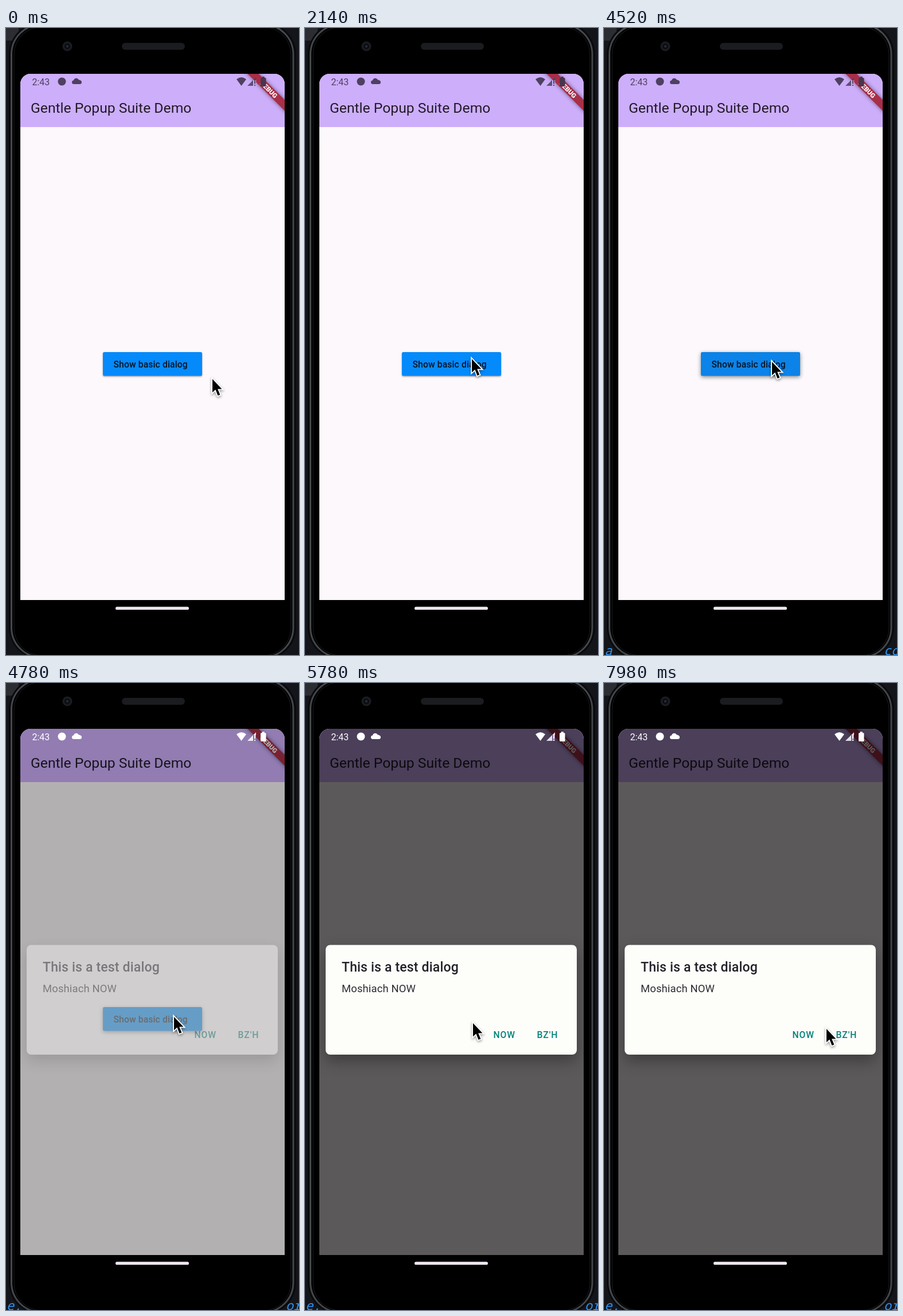
An HTML page with a canvas for the animation above (8 s loop, 511 by 1095 pixels).

```html
<!DOCTYPE html>
<html lang="en">
<head>
<meta charset="utf-8">
<title>Dialog demo</title>
<style>
html, body { margin: 0; width: 100%; height: 100%; overflow: hidden; background: #101116; }
canvas { display: block; width: 511px; height: 1095px; }
</style>
</head>
<body>
<canvas id="stage" width="511" height="1095"></canvas>
<script>
const W = 511, H = 1095, LOOP = 8000;
const PRESS = 3980, OPEN = 4620;
const main = document.getElementById('stage').getContext('2d');
const sheet = document.createElement('canvas');
sheet.width = W;
sheet.height = H;

const clamp = v => Math.max(0, Math.min(1, v));
const span = (t, a, b) => clamp((t - a) / (b - a));
const smooth = p => p * p * (3 - 2 * p);
const mix = (a, b, p) => a + (b - a) * p;
const easeOut = (p, power) => 1 - Math.pow(1 - p, power);

// time, x, y of the pointer tip
const POINTER = [
  [20, 360, 613], [1960, 291, 578], [2960, 291, 578], [3680, 293, 583],
  [5400, 293, 583], [5780, 293, 594], [6300, 293, 594], [7880, 388, 604]
];

function pointerAt(t) {
  let from = POINTER[0];
  for (const to of POINTER) {
    if (t < to[0]) {
      const p = smooth(span(t, from[0], to[0]));
      return [mix(from[1], to[1], p), mix(from[2], to[2], p)];
    }
    from = to;
  }
  return [from[1], from[2]];
}

function box(c, x, y, w, h, r, fill) {
  c.beginPath();
  c.roundRect(x, y, w, h, r);
  if (fill) {
    c.fillStyle = fill;
    c.fill();
  }
}

function dot(c, x, y, r, fill) {
  c.beginPath();
  c.arc(x, y, r, 0, Math.PI * 2);
  c.fillStyle = fill;
  c.fill();
}

function poly(c, points) {
  c.beginPath();
  points.forEach(([x, y]) => c.lineTo(x, y));
  c.closePath();
}

function label(c, text, x, y, size, color, weight = 400, spacing = 0) {
  c.font = `${weight} ${size}px Roboto, sans-serif`;
  c.letterSpacing = spacing + 'px';
  c.fillStyle = color;
  c.fillText(text, x, y);
}

function shadow(c, color, blur, dy) {
  c.shadowColor = color;
  c.shadowBlur = blur;
  c.shadowOffsetY = dy;
}

function drawBackdrop(c, t) {
  c.fillStyle = '#14151a';
  c.fillRect(0, 0, W, H);
  c.fillStyle = '#2c2d32';
  c.fillRect(0, 0, 22, 22);
  if (t < PRESS) return;
  c.font = 'italic 22px "Noto Sans Mono", monospace';
  c.letterSpacing = '0px';
  c.fillStyle = '#2b95f5';
  const [left, right] = t < OPEN ? ['a', 'co'] : ['e.', 'or'];
  c.fillText(left, 1, 1095);
  c.fillText(right, 488, 1095);
}

function drawPhone(c) {
  box(c, 5, -10, 501, 1113, 56, '#090a0b');
  box(c, 9.5, -6, 491.5, 1105, 52, '#000');
  c.lineWidth = 3;
  c.strokeStyle = '#43474c';
  c.stroke();
  box(c, 14, -2, 483, 1098, 48, '#000');
  c.lineWidth = 1;
  c.strokeStyle = '#1d1e20';
  c.stroke();
  dot(c, 107, 32, 8.5, '#1b1c20');
  dot(c, 107, 32, 5, '#0c0d12');
  dot(c, 107, 32, 2.2, '#262a38');
  box(c, 202, 26, 110, 12, 6, '#1b1c20');
}

function drawBanner(c) {
  c.save();
  c.translate(458.5, 107.5);
  c.rotate(Math.PI / 4);
  shadow(c, 'rgba(0,0,0,.5)', 7, 0);
  c.fillStyle = '#a92e48';
  c.fillRect(-60, -6.7, 120, 13.4);
  shadow(c, 'transparent', 0, 0);
  c.textAlign = 'center';
  label(c, 'DEBUG', 0, 4, 11.4, '#fff', 900);
  c.restore();
}

function drawButton(c, t) {
  const lift = smooth(span(t, PRESS, PRESS + 200));
  c.save();
  shadow(c, `rgba(0,0,0,${mix(.38, .45, lift)})`, mix(3, 7, lift), mix(1.3, 2.2, lift));
  box(c, 169, 566, 173, 41.5, 2.5, '#058afb');
  c.restore();
  if (t > PRESS) {
    c.save();
    box(c, 169, 566, 173, 41.5, 2.5);
    c.clip();
    const fade = 1 - span(t, 4300, 4700);
    c.fillStyle = `rgba(0,110,150,${.2 * lift})`;
    c.fillRect(169, 566, 173, 42);
    dot(c, 287, 579, mix(5, 190, span(t, PRESS, PRESS + 900)), `rgba(50,125,235,${.4 * fade})`);
    c.restore();
  }
  label(c, 'Show basic dialog', 187.5, 592.5, 15.7, '#0a1422', 500, .11);
}

function drawStatus(c, t) {
  const p = span(t, OPEN, OPEN + 100);
  const ink = `rgb(${mix(78, 255, p)},${mix(64, 255, p)},${mix(96, 255, p)})`;
  label(c, '2:43', 45.5, 99.5, 16, ink);
  dot(c, 97.5, 93.5, 7, ink);

  // cloud
  box(c, 115, 91.5, 17, 6.5, 3.2, ink);
  dot(c, 122.5, 92.5, 4.7, ink);
  dot(c, 127, 94, 3.6, ink);

  // wifi
  c.beginPath();
  c.moveTo(410.5, 101);
  c.lineTo(402, 89.5);
  c.quadraticCurveTo(410.5, 82.5, 419, 89.5);
  c.closePath();
  c.fillStyle = ink;
  c.fill();

  // signal with a warning mark
  c.save();
  c.globalAlpha = .85;
  poly(c, [[421, 101], [436, 101], [436, 86]]);
  c.fill();
  c.restore();
  c.fillStyle = p > .5 ? '#806499' : '#cbaef7';
  c.fillRect(431, 91, 5, 10);
  c.fillStyle = ink;
  c.fillRect(433, 91, 2, 6.5);
  c.fillRect(433, 99, 2, 2);

  // battery
  const power = p > .5 ? '#fff' : '#49354d';
  box(c, 444, 87, 9.5, 15, 1.5, power);
  c.fillRect(446.7, 85, 4, 3);
}

function drawScreen(c, t) {
  c.save();
  box(c, 25, 80, 461, 919, [18, 18, 0, 0]);
  c.clip();
  c.fillStyle = '#fcf8fb';
  c.fillRect(25, 80, 462, 920);
  c.fillStyle = '#cdaefa';
  c.fillRect(25, 80, 462, 93);
  label(c, 'Gentle Popup Suite Demo', 43, 148, 24.7, '#211b2a');
  drawBanner(c);
  drawButton(c, t);
  const dim = .64 * easeOut(span(t, OPEN, 5360), 2.45);
  c.fillStyle = `rgba(2,0,0,${dim})`;
  c.fillRect(25, 80, 462, 920);
  drawStatus(c, t);
  c.restore();
  box(c, 191, 1010.8, 128, 5.2, 2.6, '#ece5ee');
}

// The dialog is painted once, then faded in as a group.
function paintDialog() {
  const c = sheet.getContext('2d');
  c.clearRect(0, 0, W, H);
  c.save();
  c.beginPath();
  c.rect(25, 80, 461, 919);
  c.clip();
  shadow(c, 'rgba(0,0,0,.34)', 26, 11);
  box(c, 36, 457.5, 438, 191.5, 8, '#fdfdfa');
  c.restore();
  label(c, 'This is a test dialog', 64, 504, 23, '#222128', 500, .16);
  label(c, 'Moshiach NOW', 64, 540, 18.4, '#2c2b31', 400, .17);
  label(c, 'NOW', 328.5, 619.5, 15.7, '#038078', 500, .9);
  label(c, "BZ'H", 404.5, 619.5, 15.7, '#038078', 500, .9);
}

function drawPointer(c, t) {
  const [x, y] = pointerAt(t);
  c.save();
  c.translate(x, y);
  poly(c, [[0, 0], [0, 23.5], [5.4, 18.6], [9.5, 29], [13.4, 27.4], [9.2, 17.4], [16.5, 17.4]]);
  c.lineJoin = 'miter';
  c.lineWidth = 3.6;
  c.strokeStyle = '#fff';
  shadow(c, 'rgba(0,0,0,.4)', 4, 2);
  c.stroke();
  shadow(c, 'transparent', 0, 0);
  c.fillStyle = '#000';
  c.fill();
  c.restore();
}

function draw(t) {
  drawBackdrop(main, t);
  drawPhone(main);
  drawScreen(main, t);
  if (t > OPEN) {
    main.globalAlpha = easeOut(span(t, OPEN, 5150), 1.4);
    main.drawImage(sheet, 0, 0);
    main.globalAlpha = 1;
  }
  drawPointer(main, t);
}

const start = performance.now();
function tick() {
  draw((performance.now() - start) % LOOP);
  requestAnimationFrame(tick);
}
paintDialog();
tick();
</script>
</body>
</html>
```
